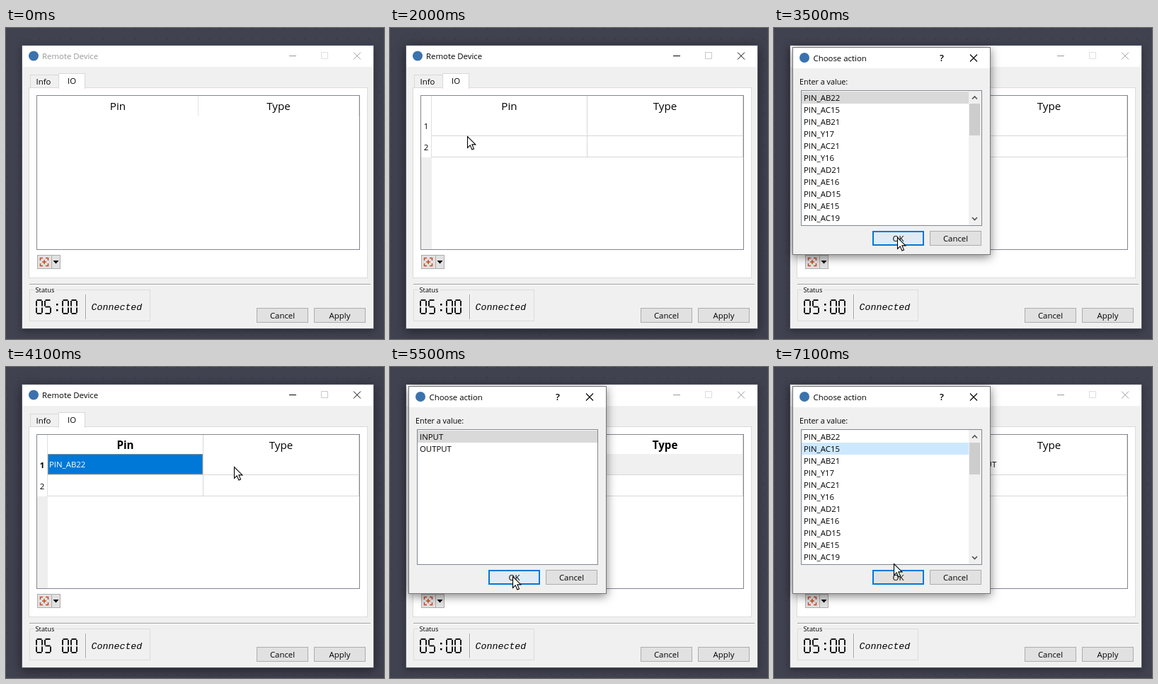
An HTML page with a canvas that plays this animation: 534x440 px, repeating every 7200 ms.

```html
<!DOCTYPE html>
<html lang="en">
<head>
<meta charset="utf-8">
<title>Remote Device</title>
<style>
html, body { margin: 0; width: 100%; height: 100%; overflow: hidden; background: #404250; }
canvas { display: block; }
</style>
</head>
<body>
<canvas id="stage" width="534" height="440"></canvas>
<script>
const LOOP = 7200, STEP = 100, W = 534, H = 440;
const stage = document.getElementById('stage').getContext('2d');
const layerCanvas = Object.assign(document.createElement('canvas'), { width: W, height: H });
const layer = layerCanvas.getContext('2d');
let g = stage;

const BLUE = '#0078d7', FACE = '#f0f0f0', GRID = '#d8d8d8', UI = '"Open Sans", sans-serif';
const PINS = ['AB22', 'AC15', 'AB21', 'Y17', 'AC21', 'Y16', 'AD21', 'AE16', 'AD15', 'AE15', 'AC19'].map(p => 'PIN_' + p);
const DIALOGS = [
  { open: 2180, close: 3520, pick: 2950, row: 0, items: PINS },
  { open: 4380, close: 5560, pick: 5150, row: 0, items: ['INPUT', 'OUTPUT'] },
  { open: 6080, close: 9000, pick: 6800, row: 1, items: PINS }
];
// Pointer path: time, x, y
const PATH = [
  [0, 538, 444], [650, 55, 332], [1500, 54, 331], [2000, 109, 153], [2100, 112, 142],
  [2400, 114, 140], [2800, 128, 107], [2950, 118, 99], [3050, 118, 99], [3400, 174, 296],
  [3600, 174, 296], [4100, 322, 141], [4300, 389, 137], [4700, 389, 137], [5080, 80, 99],
  [5200, 80, 99], [5450, 173, 296], [5650, 173, 296], [6000, 126, 165], [6400, 126, 165],
  [6700, 112, 115], [6850, 112, 115], [7100, 169, 278], [7200, 175, 292]
];

const clamp = v => Math.max(0, Math.min(1, v));

function pointerAt(t) {
  const i = PATH.findIndex(p => p[0] > t), a = PATH[i - 1], b = PATH[i];
  const k = (t - a[0]) / (b[0] - a[0]);
  return { x: a[1] + (b[1] - a[1]) * k, y: a[2] + (b[2] - a[2]) * k };
}

const inside = (p, x, y, w, h) => p.x >= x && p.x < x + w && p.y >= y && p.y < y + h;

function fill(x, y, w, h, color) {
  g.fillStyle = color;
  g.fillRect(x, y, w, h);
}

function box(x, y, w, h, color, border, line = 1) {
  fill(x, y, w, h, border);
  fill(x + line, y + line, w - 2 * line, h - 2 * line, color);
}

function text(s, x, y, { size = 11.4, color = '#000', align = 'left', style = '', family = UI } = {}) {
  g.font = `${style} ${size}px ${family}`;
  g.fillStyle = color;
  g.textAlign = align;
  g.fillText(s, x, y);
}

function stroke(d, color, width = 1) {
  g.strokeStyle = color;
  g.lineWidth = width;
  g.stroke(new Path2D(d));
}

function disc(x, y, r, color) {
  g.fillStyle = color;
  g.beginPath();
  g.arc(x, y, r, 0, 7);
  g.fill();
}

function button(label, x, y, look = {}) {
  box(x, y, 73, 21, look.face || '#e1e1e1', look.border || '#adadad', look.line);
  text(label, x + 36.5, y + 15, { align: 'center', color: look.color });
}

function shadow(blur, alpha) {
  g.shadowColor = `rgba(0,0,0,${alpha})`;
  g.shadowBlur = blur;
  g.shadowOffsetY = blur && 3;
}

function drawDesktop() {
  fill(0, 0, W, H, '#404250');
  for (let y = 0; y < H; y += 15)
    for (let x = 2; x < W; x += 15) fill(x, y, 1, 1, '#2a2c36');
}

function digit(x, y, segments) {
  const shapes = {
    a: 'M1.5 1H8.5', b: 'M9 2V9.5', c: 'M9 11.5V19', d: 'M1.5 20H8.5',
    e: 'M1 11.5V19', f: 'M1 2V9.5', g: 'M1.5 10.5H8.5'
  };
  g.save();
  g.translate(x, y);
  for (const s of segments) stroke(shapes[s], '#000', 1.8);
  g.restore();
}

function drawStatus(t) {
  fill(33, 362, 482, 1, '#a0a0a0');
  fill(33, 363, 482, 1, '#fff');
  box(33, 370, 171, 45, FACE, '#dcdcdc');
  fill(40, 368, 30, 5, FACE);
  text('Status', 41.5, 374, { size: 9.3 });
  digit(42, 384, 'abcdef');
  digit(54, 384, 'acdfg');
  digit(79, 384, 'abcdef');
  digit(91, 384, 'abcdef');
  if ((t + 510) % 1200 < 620) {
    fill(71, 390, 2.5, 2.5, '#000');
    fill(71, 398, 2.5, 2.5, '#000');
  }
  fill(112, 377, 1, 35, '#a0a0a0');
  fill(113, 377, 1, 35, '#fff');
  text('Connected', 120.5, 399, { size: 13.3, style: 'italic', family: '"Liberation Mono", monospace' });
}

function drawTable(t, focused) {
  const rows = (t >= 800) + (t >= 1200);
  const selected = t < 2100 ? null : t < 4300 ? [0, 0] : t < 6000 ? [0, 1] : [1, 0];
  const left = rows ? 58 : 44, middle = rows ? 278 : 271, edge = [left, middle, 498];
  const values = [[t > DIALOGS[0].close && 'PIN_AB22', t > DIALOGS[1].close && 'INPUT'], []];

  box(43, 95, 457, 219, '#fff', '#828790');
  if (rows) fill(44, 123 + rows * 30, 15, 190 - rows * 30, '#eee');
  ['Pin', 'Type'].forEach((name, col) => {
    const bold = selected && selected[1] === col;
    text(name, (edge[col] + edge[col + 1]) / 2 + 0.5, 116, { size: 15.2, align: 'center', style: bold ? 'bold' : '' });
    fill(edge[col + 1], 96, 1, 28 + rows * 30 - (rows ? 1 : 0), rows ? GRID : '#e5e5e5');
  });
  if (rows) fill(58, 96, 1, 27 + rows * 30, '#e0e0e0');
  for (let r = 0; r < rows; r++) {
    const y = 123 + r * 30, current = selected && selected[0] === r;
    fill(58, y + 29, 441, 1, GRID);
    text(r + 1, 51, y + 20, { align: 'center', style: current ? 'bold' : '' });
    for (let c = 0; c < 2; c++) {
      const x = edge[c] + 1, on = current && selected[1] === c;
      if (on) {
        fill(x, y, 219, 29, focused ? BLUE : FACE);
        if (focused) {
          g.setLineDash([1, 1]);
          stroke(`M${x + 0.5} ${y + 0.5}h218v28h-218z`, '#e8a860');
          g.setLineDash([]);
        }
      }
      if (values[r][c]) text(values[r][c], x + 2, y + 19, { color: on && focused ? '#fff' : '#000' });
    }
  }
}

function drawToolButton(pointer) {
  const hover = inside(pointer, 44, 321, 33, 20);
  box(44, 321, 33, 20, hover ? '#e5f1fb' : '#e1e1e1', hover ? BLUE : '#adadad');
  fill(64, 322, 1, 18, hover ? BLUE : '#adadad');
  stroke('M48.5 329v-3.5h3.5M56 325.5h3.5v3.5M59.5 333v3.5h-3.5M52 336.5h-3.5v-3.5M51 331h6M54 328v6', '#cf4526', 1.5);
  g.fillStyle = '#000';
  g.fill(new Path2D('M66.5 329h8l-4 4.5z'));
}

function drawWindow(t, active, focused, pointer) {
  const ink = active ? '#000' : '#999';
  shadow(active ? 14 : 9, active ? 0.5 : 0.35);
  fill(22, 24, 498, 402, '#555965');
  shadow(0, 0);
  fill(23, 25, 496, 400, FACE);
  fill(23, 25, 496, 30, '#fff');
  disc(39, 39.5, 7, '#3b72ae');
  text('Remote Device', 51, 44, { color: ink });
  stroke('M400 39.5h10M491 34.5l10 10m0-10l-10 10', ink);
  stroke('M445.5 34.5h9v9h-9z', active ? '#c8c8c8' : '#dedede');

  box(32, 84, 479, 270, '#fff', '#dcdcdc');
  box(34, 66, 41, 19, FACE, '#d9d9d9');
  box(74, 64, 38, 22, '#fff', '#d9d9d9');
  fill(75, 84, 36, 3, '#fff');
  text('Info', 42.5, 80);
  text('IO', 93, 79, { align: 'center' });
  drawTable(t, focused);
  drawToolButton(pointer);
  drawStatus(t);
  button('Cancel', 354, 396);
  button('Apply', 435, 396);
}

function drawDialog(d, t, pointer) {
  const picked = t >= d.pick, scrolls = d.items.length > 5, listRight = scrolls ? 275 : 293;
  const overOk = inside(pointer, 139, 287, 73, 21);
  box(26, 27, 280, 294, FACE, '#777');
  fill(27, 28, 278, 29, '#fff');
  disc(43, 42, 7, '#3b72ae');
  text('Choose action', 55.5, 47);
  text('?', 237, 47, { size: 13, align: 'center', style: '600' });
  stroke('M277 37.5l10 10m0-10l-10 10', '#000', 1.1);
  text('Enter a value:', 36, 80, { size: 10.8 });

  box(38, 88, 256, 192, '#fff', '#828790');
  d.items.forEach((item, i) => {
    const y = 90 + i * 17, hover = inside(pointer, 39, y, listRight - 39, 17);
    const chosen = picked && i === d.row;
    const color = chosen ? (t > d.close - 120 ? '#d9d9d9' : '#cce8ff') : hover && '#e5f3ff';
    if (color) fill(39, y, listRight - 39, 17, color);
    text(item, 42, y + 13);
  });
  if (scrolls) {
    fill(275, 89, 18, 190, FACE);
    fill(276, 107, 15, 45, '#cdcdcd');
    stroke('M280 100.5l3.5-3.5 3.5 3.5M280 268l3.5 3.5 3.5-3.5', '#505050', 1.6);
  }
  button('OK', 139, 287, picked
    ? { face: overOk ? '#e0ebf5' : '#e1e1e1', border: BLUE, line: 2 }
    : { face: '#ccc', border: '#bfbfbf', color: '#838383' });
  button('Cancel', 220, 287);
}

function showDialog(d, t, pointer, alpha) {
  g = layer;
  g.clearRect(0, 0, W, H);
  drawDialog(d, t, pointer);
  g = stage;
  const scale = 0.945 + 0.055 * alpha;
  g.save();
  g.globalAlpha = alpha;
  g.translate(166, 174);
  g.scale(scale, scale);
  shadow(14, 0.5);
  g.drawImage(layerCanvas, -166, -174);
  g.restore();
}

function drawPointer({ x, y }) {
  g.save();
  g.translate(Math.round(x) + 0.5, Math.round(y) + 0.5);
  const arrow = 'M0 0V16L3.7 12.4L6.4 18.5L9 17.4L6.4 11.4H11.4Z';
  g.fillStyle = '#fff';
  g.fill(new Path2D(arrow));
  stroke(arrow, '#000', 1.1);
  g.restore();
}

function render(t) {
  const pointer = pointerAt(t);
  const dialog = DIALOGS.find(d => t >= d.open && t < d.close + 150);
  const alpha = dialog ? Math.min(clamp((t - dialog.open) / 165), clamp(1 - (t - dialog.close) / 150)) : 0;
  const modal = dialog && t < dialog.close;
  drawDesktop();
  drawWindow(t, t >= 800 && !modal, !modal || alpha < 0.5, pointer);
  if (dialog) showDialog(dialog, t, pointer, alpha);
  drawPointer(pointer);
}

const start = performance.now();
function tick() {
  const elapsed = (performance.now() - start) % LOOP;
  render(Math.floor(elapsed / STEP) * STEP);
  requestAnimationFrame(tick);
}
tick();
</script>
</body>
</html>
```
